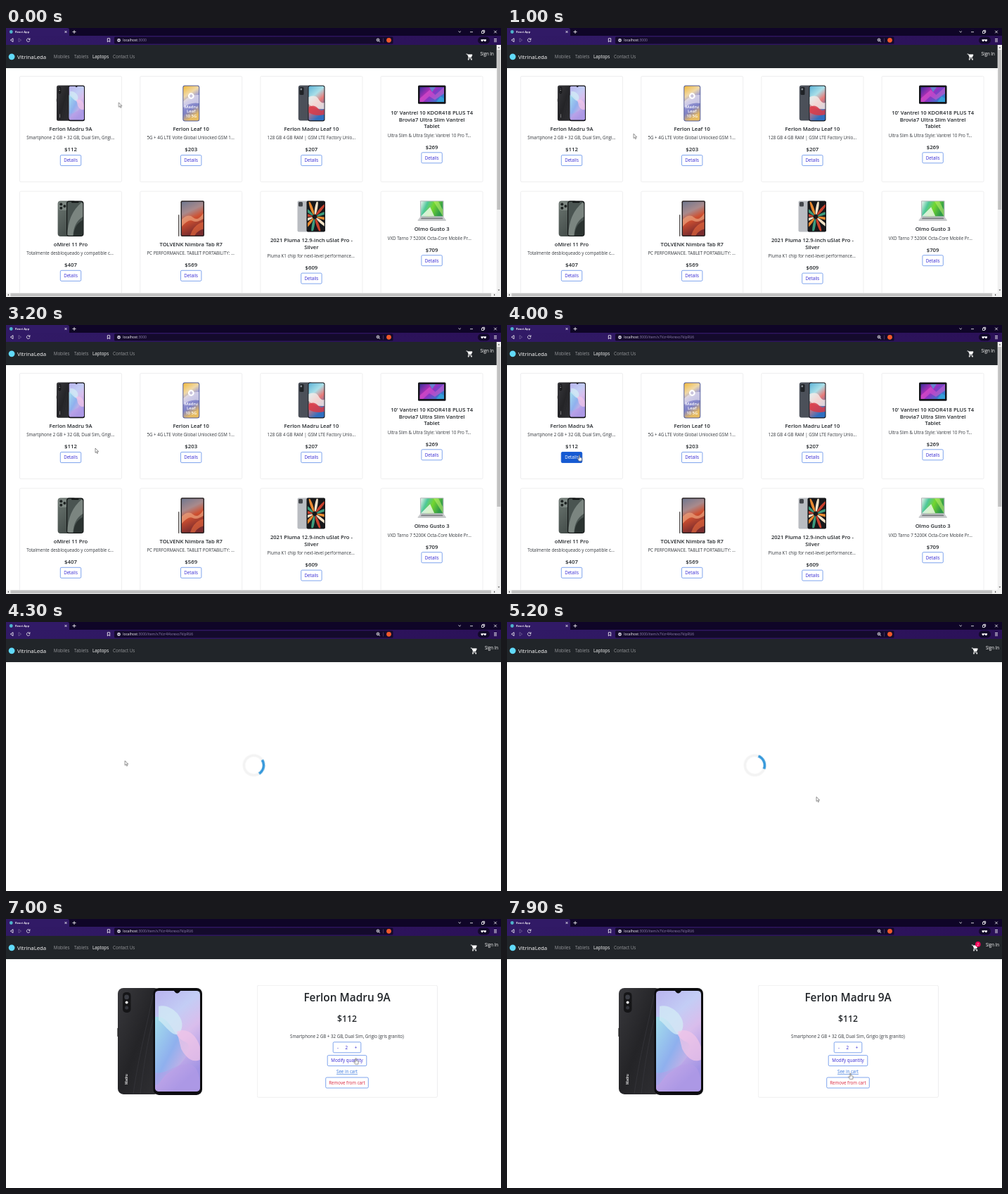
Recreate the animation shown at these times as an HTML page. Size 704 by 382 pixels, loop 8000 ms.

```html
<!DOCTYPE html>
<html lang="en">
<head>
<meta charset="utf-8">
<title>Shop demo</title>
<style>
html, body { margin: 0; width: 100%; height: 100%; overflow: hidden; background: #fff; }
svg { display: block; width: 100vw; height: 100vh; }
text { font: 6.2px "Open Sans", "Noto Sans", sans-serif; fill: #212529; white-space: pre; }
.mid { text-anchor: middle; }
.h5 { font-size: 7.6px; font-weight: 600; }
.price { font-size: 7.8px; font-weight: 600; }
.h2 { font-size: 12.2px; font-weight: 600; }
.h1 { font-size: 15.4px; font-weight: 600; }
.desc { fill: #33373c; }
.url { font-size: 5px; fill: #8d80ac; }
.nav { fill: #96989b; }
.white { fill: #fff; }
.btn rect { fill: #fff; stroke: #4a7fe6; stroke-width: .7; }
.btn text { fill: #3326d2; text-anchor: middle; }
.btn.red text { fill: #d9263f; }
.btn.hot rect { fill: #155ad2; stroke: #155ad2; }
.btn.hot text { fill: #fff; }
.card { fill: #fff; stroke: #e2e3e5; stroke-width: .6; }
.line { fill: none; stroke: #fff; stroke-width: .8; }

.k { animation: 8s step-end infinite; }
.shop { animation-name: shop; }
.load { animation-name: load; }
.item { animation-name: item; }
.path { animation-name: path; }
.wide { animation-name: wide; }
.details-hot { animation-name: details-hot; }
.plus-hot { animation-name: plus-hot; }
.add-hot { animation-name: add-hot; }
.one { animation-name: one; }
.two { animation-name: two; }
.before { animation-name: before; }
.after { animation-name: after; }
.drop { animation-name: drop; }
.badge { animation-name: badge; }
.arrow { animation-name: arrow; }
.hand { animation-name: hand; }
@keyframes shop { 0% { opacity: 1 } 51%, 100% { opacity: 0 } }
@keyframes load { 0% { opacity: 0 } 51% { opacity: 1 } 66%, 100% { opacity: 0 } }
@keyframes item { 0% { opacity: 0 } 66%, 100% { opacity: 1 } }
@keyframes path { 0% { opacity: 0 } 48.5%, 100% { opacity: 1 } }
@keyframes wide { 0% { transform: none } 51%, 100% { transform: translate(6.3px, 0) } }
@keyframes details-hot { 0% { opacity: 0 } 43.5%, 100% { opacity: 1 } }
@keyframes plus-hot { 0% { opacity: 0 } 74.4% { opacity: 1 } 81.6%, 100% { opacity: 0 } }
@keyframes add-hot { 0% { opacity: 0 } 82% { opacity: 1 } 87.4%, 100% { opacity: 0 } }
@keyframes one { 0% { opacity: 1 } 79.8%, 100% { opacity: 0 } }
@keyframes two { 0% { opacity: 0 } 79.8%, 100% { opacity: 1 } }
@keyframes before { 0% { opacity: 1 } 87.4%, 100% { opacity: 0 } }
@keyframes after { 0% { opacity: 0 } 87.4%, 100% { opacity: 1 } }
@keyframes drop { 0% { transform: none } 87.4%, 100% { transform: translate(0, 3.6px) } }
@keyframes badge { 0% { opacity: 0 } 88.5%, 100% { opacity: 1 } }
@keyframes hand { 0% { opacity: 0 } 43.5% { opacity: 1 } 51% { opacity: 0 } 74.4% { opacity: 1 } 88.5% { opacity: 0 } 98%, 100% { opacity: 1 } }
@keyframes arrow { 0% { opacity: 1 } 43.5% { opacity: 0 } 51% { opacity: 1 } 74.4% { opacity: 0 } 88.5% { opacity: 1 } 98%, 100% { opacity: 0 } }

.spin { animation: spin 1s linear infinite; }
@keyframes spin { from { transform: rotate(-6deg) } to { transform: rotate(354deg) } }

.cursor { animation: cursor 8s ease-in-out infinite; }
@keyframes cursor {
  0% { transform: translate(160.3px, 105.8px) }
  12% { transform: translate(180px, 150px) }
  23.5% { transform: translate(196px, 190px) }
  27.5%, 29% { transform: translate(185.8px, 209px) }
  40% { transform: translate(127px, 175px) }
  45%, 51% { transform: translate(103px, 184.5px) }
  60%, 69% { transform: translate(440px, 248.3px) }
  75.5%, 80% { transform: translate(499px, 185.5px) }
  82.5%, 87.5% { transform: translate(497.5px, 197.5px) }
  91%, 92.8% { transform: translate(543px, 184px) }
  98.7%, 100% { transform: translate(488.5px, 218.7px) }
}
</style>
</head>
<body>
<svg viewBox="0 0 704 382" preserveAspectRatio="none">
<defs>
  <linearGradient id="bar"><stop offset="0" stop-color="#311a66"/><stop offset="1" stop-color="#2b1158"/></linearGradient>
  <linearGradient id="shell" x2="1" y2="1"><stop offset="0" stop-color="#39393d"/><stop offset=".5" stop-color="#242427"/><stop offset="1" stop-color="#303034"/></linearGradient>
  <linearGradient id="lilac" x2=".4" y2="1"><stop offset="0" stop-color="#b9b4ee"/><stop offset=".35" stop-color="#c3cdf5"/><stop offset=".6" stop-color="#d9bdec"/><stop offset="1" stop-color="#a294e4"/></linearGradient>
  <linearGradient id="wave" x2="1" y2="1"><stop offset="0" stop-color="#a5e2ec"/><stop offset=".5" stop-color="#8fb0ee"/><stop offset="1" stop-color="#f3b1e0"/></linearGradient>
  <linearGradient id="sunny" x2=".3" y2="1"><stop offset="0" stop-color="#f1b93a"/><stop offset=".3" stop-color="#f0d9a8"/><stop offset=".5" stop-color="#9a9ad6"/><stop offset=".75" stop-color="#7f82c6"/><stop offset="1" stop-color="#e6bb62"/></linearGradient>
  <linearGradient id="paint" x2=".4" y2="1"><stop offset="0" stop-color="#5fb4d8"/><stop offset=".35" stop-color="#a9dfe8"/><stop offset=".6" stop-color="#e87a78"/><stop offset="1" stop-color="#2f6fc0"/></linearGradient>
  <linearGradient id="neon" x2="1" y2=".6"><stop offset="0" stop-color="#3b2f9b"/><stop offset=".4" stop-color="#b02fb8"/><stop offset=".6" stop-color="#8a35c4"/><stop offset="1" stop-color="#2f7fcf"/></linearGradient>
  <linearGradient id="moss" x2=".5" y2="1"><stop offset="0" stop-color="#6c7671"/><stop offset="1" stop-color="#434c49"/></linearGradient>
  <linearGradient id="dune" x2=".3" y2="1"><stop offset="0" stop-color="#70788f"/><stop offset=".35" stop-color="#a98a8c"/><stop offset=".6" stop-color="#cf5030"/><stop offset="1" stop-color="#7b2c2e"/></linearGradient>
  <linearGradient id="leaf" x2="1" y2=".3"><stop offset="0" stop-color="#e9f5ee"/><stop offset=".3" stop-color="#4fc79a"/><stop offset=".6" stop-color="#74d62f"/><stop offset="1" stop-color="#2f9a4a"/></linearGradient>
  <clipPath id="pane"><rect x="53" y="4" width="64" height="143" rx="5"/></clipPath>
  <clipPath id="slate"><rect x="429" y="246.800" width="23.700" height="41.400" rx="1"/></clipPath>
  <g id="duo">
    <rect width="60" height="151" rx="8" fill="url(#shell)"/>
    <rect x="-.6" y="57" width="1.2" height="12" fill="#222"/>
    <path d="M22 150C30 95 40 60 50 10M32 150C38 100 44 70 50 45" fill="none" stroke="#36363b" stroke-width=".8"/>
    <rect x="7" y="6" width="11.500" height="29" rx="5" fill="#151517"/>
    <circle cx="12.600" cy="13" r="3.300" fill="#3b3d44"/><circle cx="12.600" cy="20.500" r="2" fill="#e8e8e8"/><circle cx="12.600" cy="28" r="2.500" fill="#34363c"/>
    <text class="white" transform="translate(14.200 137) rotate(-90)" style="font-size:4.600px;font-weight:600">Madru</text>
    <rect x="50.500" width="69.500" height="152" rx="8" fill="#0d0d10"/>
    <rect x="53" y="4" width="64" height="143" rx="5" fill="url(#lilac)"/>
    <g clip-path="url(#pane)">
      <path d="M50 42C75 35 78 70 95 76S92 110 76 118 62 140 50 138z" fill="url(#wave)"/>
      <path d="M58 26c16-5 40 16 32 34S66 50 58 46z" fill="#d3ecf6" opacity=".75"/>
      <path d="M84 62c18-8 34 10 36 38-14 10-25-4-30-14z" fill="#f2c6e8" opacity=".7"/>
      <path d="M50 120c20 4 30-12 48-12s18 20 22 44H50z" fill="#b79ee8" opacity=".5"/>
    </g>
    <path d="M79 3h11l-3 3.500q-2.500 2-5 0z" fill="#0d0d10"/>
  </g>
</defs>

<!-- browser -->
<rect width="704" height="11.500" fill="#0f0527"/>
<path d="M0 0h87q3 0 3 3v9H0z" fill="#311a66"/>
<rect y="11" width="704" height="13" fill="url(#bar)"/>
<circle cx="7.300" cy="5.500" r="2.400" fill="#4fb4cb"/>
<text class="white" x="13" y="7.200" style="font-size:4.200px;font-weight:600">React App</text>
<path class="line" d="M83.500 4l3 3m0-3l-3 3M94.500 5.500h5M97 3v5M643.500 4.500l1.700 1.700 1.700-1.700M660 5.700h4M676.500 4.500h3v3h-3zM677.700 4.300v-1h3v3h-1M694.200 3.700l3.600 3.600m0-3.600l-3.600 3.600"/>
<path class="line" d="M10 14.700v5l-3.600-2.500z"/>
<path class="line" d="M18 14.700v5l3.600-2.500z" opacity=".3"/>
<path class="line" d="M33.500 15.800a2.300 2.300 0 1 0 .4 2M34 14.500v1.900h-1.900"/>
<path class="line" d="M144.300 14.800h3.400v5l-1.700-1.500-1.700 1.500z"/>
<rect x="154" y="12.400" width="396.500" height="10.200" rx="1.500" fill="#140a2c"/>
<circle cx="160.500" cy="17.400" r="2.400" fill="#d9d6e3"/><path d="M159 17.400h3" stroke="#140a2c" stroke-width=".7"/>
<text class="url" x="166.200" y="19.100"><tspan fill="#fff">localhost</tspan>:3000<tspan class="k path">/item/x7Vzr4l4xrexo7kIpRU6</tspan></text>
<circle class="line" cx="529" cy="16.900" r="1.900"/><path class="line" d="M530.400 18.300l1.600 1.600M528 16.900h2"/>
<path d="M536.500 14.500v6" stroke="#6a5b8d" stroke-width=".5"/>
<circle cx="544.500" cy="17.300" r="3.400" fill="#f0592b"/>
<rect x="671" y="12.500" width="17" height="10" rx="5" fill="#12082a"/>
<path d="M675.500 16.200h7.500v1.300q-.4 1.700-1.700 1.700t-1.700-1.700h-.7q-.4 1.700-1.700 1.700t-1.700-1.700z" fill="#fff"/>
<path class="line" d="M694 15.500h4M694 17.400h4M694 19.300h4"/>

<!-- navigation -->
<rect y="24" width="704" height="33" fill="#212529"/>
<circle cx="8.100" cy="40.800" r="4.400" fill="#61dafb"/>
<text class="white" x="16" y="43.700" style="font-size:7.800px">VitrinaLeda</text>
<text class="nav" x="67.800" y="43.300">Mobiles</text>
<text class="nav" x="97" y="43.300">Tablets</text>
<text class="white" x="123" y="43.300">Laptops</text>
<text class="nav" x="152" y="43.300">Contact Us</text>
<g class="k wide">
  <path d="M654.500 37h1.700l2 4.500h3.300l1.500-3.500h-6" fill="none" stroke="#fff" stroke-width=".9"/>
  <path d="M656.600 37.800h6.500l-1.800 4h-3.200z" fill="#fff"/>
  <path d="M658.200 41.500l-.9 1.700h5.300" fill="none" stroke="#fff" stroke-width=".9"/>
  <circle cx="657.700" cy="44.700" r=".9" fill="#fff"/><circle cx="662" cy="44.700" r=".9" fill="#fff"/>
  <text class="white" x="674.600" y="38.500">Sign In</text>
</g>
<g class="k badge"><circle cx="669.800" cy="35.900" r="3.800" fill="#f50057"/><text class="mid white" x="669.800" y="37.700" style="font-size:5px">2</text></g>

<!-- product list -->
<g class="k shop">
  <g id="cards"></g>
  <use href="#duo" transform="translate(72 81.500) scale(.3333)"/>

  <rect x="251.300" y="81.500" width="24" height="51" rx="3" fill="#565f9c"/>
  <rect x="252.300" y="82.500" width="22" height="49" rx="2.200" fill="url(#sunny)"/>
  <path d="M252.300 104q10-10 22-9v12q-12-2-22 6z" fill="#f4eef3" opacity=".6"/>
  <circle cx="263.300" cy="96.500" r="4.400" fill="#fff"/><circle cx="263.300" cy="96.500" r="2.200" fill="#c9c3dc"/>
  <text class="mid white" style="font-size:6px;font-weight:600"><tspan x="263.300" y="114">Madru</tspan><tspan x="263.300" y="120.300">Leaf</tspan><tspan x="263.300" y="126.600">10 5G</tspan></text>

  <rect x="415.800" y="81.500" width="20" height="50" rx="3" fill="#4b5059"/>
  <rect x="417.500" y="84" width="6" height="11" rx="1.500" fill="#1f2226"/><circle cx="419.800" cy="87" r="1.400" fill="#878c94"/>
  <rect x="429.500" y="81.500" width="24" height="51" rx="3" fill="#15171d"/>
  <rect x="430.500" y="82.600" width="22" height="48.600" rx="2" fill="url(#paint)"/>
  <path d="M430.500 98q10-4 14 3t8 5v9q-14 1-22-7z" fill="#f6ece9" opacity=".8"/>
  <path d="M430.500 112q8-4 13 2t9 1v8q-12 3-22-3z" fill="#d83a48" opacity=".85"/>

  <rect x="586" y="81.500" width="39.500" height="26.300" rx="1.500" fill="#14151b"/>
  <rect x="588.500" y="84" width="34.500" height="21" fill="url(#neon)"/>
  <path d="M588.500 100l14-12 8 7 12.500-11v9l-13 9-8-5-9 8h-4.500z" fill="#e858d0" opacity=".5"/>
  <path d="M602 84h9l-5 7zM612 105l6-8 5 3v5z" fill="#38b3dc" opacity=".6"/>

  <rect x="73.600" y="245.500" width="26" height="50.500" rx="4" fill="url(#moss)"/>
  <rect x="75" y="247" width="12" height="12" rx="3" fill="#7c8681"/>
  <g fill="#1e2322"><circle cx="78.300" cy="250.200" r="2"/><circle cx="78.300" cy="255.800" r="2"/><circle cx="83.400" cy="253" r="2"/></g>
  <rect x="86" y="245.500" width="24.500" height="50.500" rx="4" fill="#101313"/>
  <rect x="87.200" y="246.700" width="22.100" height="48.100" rx="3" fill="#4a5451"/>
  <path d="M87.200 294q1-30 20-46 2 0 2.100 2v18q-13 8-14 26.800h-5q-2 0-3.100-.8z" fill="#8b9690" opacity=".75"/>
  <path d="M96 294.800q1-16 13.300-22v19q0 3-3 3z" fill="#2b3331"/>
  <rect x="93" y="246" width="10.500" height="2.200" rx="1" fill="#101313"/>

  <rect x="245" y="265" width="1.400" height="31" rx=".7" fill="#55504f"/>
  <rect x="248.500" y="245.300" width="33.500" height="50.700" rx="2" fill="#2c2526"/>
  <rect x="250" y="246.800" width="30.500" height="47.700" rx="1" fill="url(#dune)"/>
  <path d="M250 272q9-9 16-3t14.500-6v8q-9 6-15 3t-15.500 8z" fill="#eda27c" opacity=".7"/>
  <path d="M262 294.500q5-16 18.500-19v10q-8 2-12 9z" fill="#e0653c" opacity=".7"/>

  <rect x="415.500" y="247" width="1.500" height="41" rx=".7" fill="#d5d7da"/>
  <rect x="414.500" y="245.500" width="24" height="44" rx="2" fill="#b9bcc1"/>
  <rect x="416" y="247" width="6" height="6.500" rx="1.500" fill="#43464b"/>
  <rect x="427.500" y="245.500" width="26.500" height="44" rx="2" fill="#17181b"/>
  <g id="petals" clip-path="url(#slate)"></g>

  <rect x="589" y="245.300" width="33.500" height="24" rx="1" fill="#b7babd"/>
  <rect x="590.200" y="246.300" width="31.100" height="21" fill="url(#leaf)"/>
  <path d="M590.200 267.300l13-13 6 13z" fill="#f4faf0" opacity=".8"/>
  <path d="M608 246.300h7l6.300 12v9z" fill="#b9ef6a" opacity=".6"/>
  <path d="M589 268.500h33.500l3.500 4.500q0 1-1 1h-38.500q-1 0-1-1z" fill="#c9cbcd"/>
  <path d="M591 269.500h29.500l1.200 1.700h-32z" fill="#777a7e"/>

  <path d="M697.700 24h6.300v358H0v-6h697.700z" fill="#f1f1f1"/>
  <rect x="698.300" y="31" width="5" height="227" fill="#c1c1c1"/>
  <rect x="6.500" y="376.700" width="683.500" height="4.600" fill="#c1c1c1"/>
  <path d="M699.500 28.500l1.400-1.700 1.400 1.700zM699.500 371.500l1.400 1.700 1.400-1.700zM4 377.600l-1.700 1.400 1.700 1.400zM694 377.600l1.700 1.400-1.700 1.400z" fill="#505050"/>
</g>

<!-- spinner -->
<g class="k load"><g transform="translate(352.500 203.500)" fill="none" stroke-width="3.700">
  <circle r="14" stroke="#f3f3f3"/>
  <path class="spin" d="M-9.900-9.900A14 14 0 0 1 9.900-9.900" stroke="#3498db"/>
</g></g>

<!-- product page -->
<g class="k item">
  <g class="k drop"><use href="#duo" x="159" y="94.300"/></g>
  <rect class="card k before" x="357.300" y="94.300" width="256.200" height="120.900" rx="2"/>
  <rect class="card k after" x="357.300" y="94.300" width="256.200" height="159" rx="2"/>
  <text class="mid h1" x="485" y="117">Ferlon Madru 9A</text>
  <text class="mid h2" x="485" y="146">$112</text>
  <text class="mid desc" x="485" y="168.800">Smartphone 2 GB + 32 GB, Dual Sim, Grigio (gris granito)</text>
  <g id="panel"></g>
</g>

<g class="cursor">
  <path class="k arrow" d="M0 0v6.400l1.500-1.300 1.100 2.400 1-.5-1-2.300h2z" fill="#fff" stroke="#222" stroke-width=".5"/>
  <path class="k hand" d="M-.7.600q.7-1 1.400 0v3l2.200.500q.9.300.8 1.300l-.6 3.400h-3.900l-2-3.300q.3-.900 1.200-.4l.9.700z" fill="#fff" stroke="#222" stroke-width=".5"/>
</g>
</svg>
<script>
const $ = id => document.getElementById(id);

const button = (cx, y, w, label, cls = "") =>
  `<g class="btn ${cls}"><rect x="${cx - w / 2}" y="${y}" width="${w}" height="15" rx="1.6"/>
  <text x="${cx}" y="${y + 9.8}">${label}</text></g>`;

// title lines, first baseline, description, price
const products = [
  [["Ferlon Madru 9A"], 146, "Smartphone 2 GB + 32 GB, Dual Sim, Grigi...", 112],
  [["Ferlon Leaf 10"], 146, "5G + 4G LTE Volte Global Unlocked GSM 1...", 203],
  [["Ferlon Madru Leaf 10"], 146, "128 GB 4 GB RAM | GSM LTE Factory Unlo...", 207],
  [["10' Vantrel 10 KDOR418 PLUS T4", "Brovia7 Ultra Slim Vantrel", "Tablet"], 122.7, "Ultra Slim &amp; Ultra Style: Vantrel 10 Pro T...", 269],
  [["oMirel 11 Pro"], 309.8, "Totalmente desbloqueado y compatible c...", 407],
  [["TOLVENK Nimbra Tab R7"], 309.8, "PC PERFORMANCE. TABLET PORTABILITY: ...", 569],
  [["2021 Pluma 12.9-inch uSlat Pro -", "Silver"], 303.8, "Pluma K1 chip for next-level performance...", 609],
  [["Olmo Gusto 3"], 288.2, "VXD Tarno 7 5200K Octa-Core Mobile Pr...", 709]
];

$("cards").innerHTML = products.map(([title, top, desc, price], i) => {
  const cx = 92 + (i % 4) * 171.2;
  const row = i < 4 ? 68.5 : 232;
  const base = top + (title.length - 1) * 9.8;
  return `<rect class="card" x="${cx - 72.5}" y="${row}" width="145" height="150" rx="1.5"/>` +
    title.map((line, n) => `<text class="mid h5" x="${cx}" y="${top + n * 9.8}">${line}</text>`).join("") +
    `<text class="desc" x="${cx - 62.8}" y="${base + 12.3}">${desc}</text>
    <text class="mid price" x="${cx}" y="${base + 29.3}">$${price}</text>` +
    button(cx, base + 34.5, 29.4, "Details");
}).join("") + button(92, 180.5, 29.4, "Details", "hot k details-hot");

// fan of coloured petals on the dark tablet screen
const tints = ["#e8892f", "#f3e3c8", "#c9402c", "#3c9b7c"];
$("petals").innerHTML = Array.from({ length: 12 }, (_, i) =>
  `<ellipse cx="13" rx="10" ry="1.9" fill="${tints[i % 4]}" transform="translate(439 268) rotate(${i * 30 + 10})"/>`).join("");

$("panel").innerHTML =
  button(485, 174.8, 39.6, "") +
  `<g class="btn"><text x="472" y="184.6">-</text><text x="497.5" y="184.6">+</text>
  <text class="k one" x="484.2" y="184.6">1</text><text class="k two" x="484.2" y="184.6">2</text></g>` +
  button(497.6, 174.8, 14.4, "+", "hot k plus-hot") +
  `<g class="k before">${button(485, 193.6, 42.6, "Add to cart")}</g>` +
  button(485, 193.6, 42.6, "Add to cart", "hot k add-hot") +
  `<g class="k after">${button(485, 193.6, 55.6, "Modify quantity")}
  <text class="mid" x="485" y="219.2" style="fill:#3474dc;text-decoration:underline">See in cart</text>
  ${button(485, 225, 60.6, "Remove from cart", "red")}</g>`;
</script>
</body>
</html>
```
